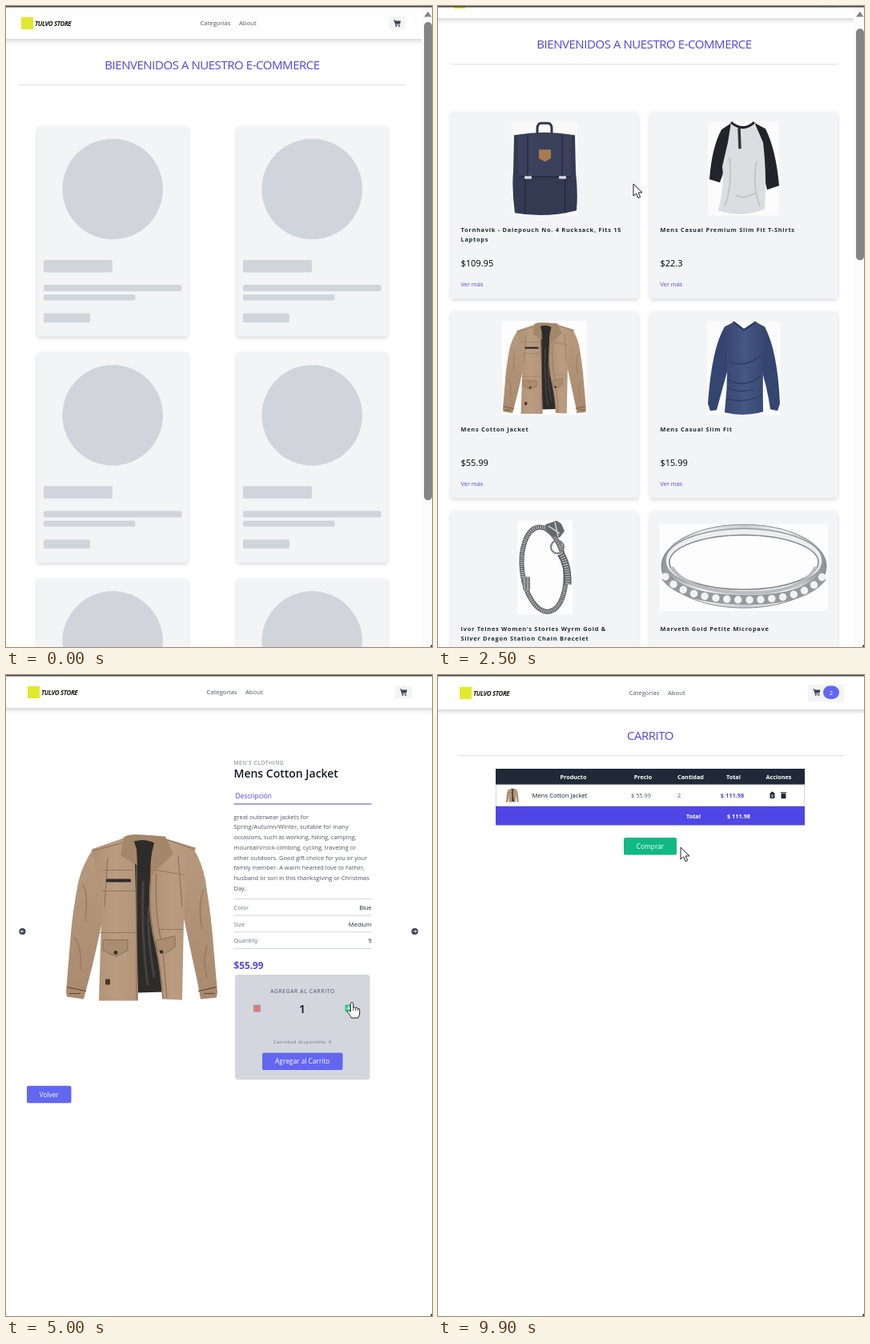
These frames come from a looping animation (532x800 px, 10 s). An HTML page:

```html
<!DOCTYPE html>
<html lang="es">
<head>
<meta charset="utf-8">
<title>Tienda</title>
<style>
  html, body { margin: 0; width: 100%; height: 100%; overflow: hidden; background: #fff; }
  svg { display: block; width: 532px; height: 800px; }
  text { font-family: "Open Sans", "Noto Sans", sans-serif; white-space: pre; }
  .card { filter: drop-shadow(0 2px 2.5px rgba(0,0,0,.15)); }
  .bar { filter: drop-shadow(0 2px 3px rgba(0,0,0,.2)); }
</style>
</head>
<body>
<svg id="stage" viewBox="0 0 532 800"></svg>
<script>
const LOOP = 10000;
const INK = '#1f2937', GREY = '#4b5563', INDIGO = '#4f46e5', VIOLET = '#6366f1', PALE = '#d1d5db', GREEN = '#10b981';

const rect = (x, y, w, h, fill, r = 0, more = '') =>
  `<rect x="${x}" y="${y}" width="${w}" height="${h}" rx="${r}" fill="${fill}" ${more}/>`;
const oval = (x, y, rx, ry, fill, more = '') =>
  `<ellipse cx="${x}" cy="${y}" rx="${rx}" ry="${ry}" fill="${fill}" ${more}/>`;
const path = (d, fill, more = '') => `<path d="${d}" fill="${fill}" ${more}/>`;
const line = (d, color, w = 1, more = '') =>
  path(d, 'none', `stroke="${color}" stroke-width="${w}" ${more}`);
const text = (x, y, str, size, fill = INK, more = '') =>
  `<text x="${x}" y="${y}" font-size="${size}" fill="${fill}" ${more}>${str.replace(/&/g, '&amp;')}</text>`;
const group = (body, more = '') => `<g ${more}>${body}</g>`;
const at = (x, y, body, scale = 1) => group(body, `transform="translate(${x} ${y}) scale(${scale})"`);
const spaced = em => `letter-spacing="${em}em"`;
const ramp = (id, dir, ...colors) => `<linearGradient id="${id}" ${dir}>` + colors.map((c, i) =>
  `<stop offset="${i / (colors.length - 1)}" stop-color="${c}"/>`).join('') + '</linearGradient>';
const MID = 'text-anchor="middle"', END = 'text-anchor="end"', BOLD = 'font-weight="700"', SEMI = 'font-weight="600"';

// ---- shared parts
const cartIcon = (x, y) => at(x, y,
  path('M-4.5-4h1.9l.5 1.1h6.6l-1 3.9h-5l.2.9h4.7v.9h-5.6l-1.4-5.7h-.9z', '#374151') +
  oval(-1.2, 3.6, .95, .95, '#374151') + oval(2.6, 3.6, .95, .95, '#374151'));

function nav(width, dx, badge) {
  const h = badge ? 43 : 41, low = badge ? 1 : 0, links = 242 + dx - (badge ? 12 : 0);
  return rect(-8, -6, width + 16, h + 6, '#fff', 0, 'class="bar"') +
    rect(19 + dx, 14 + low, 15, 15, '#dfea2c') +
    text(36 + dx, 25 + low, 'TULVO STORE', 8, '#1c1d10', `${BOLD} font-style="italic" ${spaced(-.05)}`) +
    text(links + .5, 24 + low, 'Categorias', 7.7, GREY) +
    text(links + 49, 24 + low, 'About', 7.7, GREY) +
    (badge
      ? rect(462, 12, 45, 21.5, '#f3f4f6', 2) + cartIcon(473, 21.5) +
        rect(481, 13.5, 20, 16.5, VIOLET, 8.25) + text(491, 24.5, '2', 7.6, '#fff', MID)
      : rect(478 + dx, 13.5, 21, 16, '#f3f4f6', 2) + cartIcon(488.5 + dx, 21.5));
}

const heading = (x, y, str, from, to) =>
  text(x, y, str, 15, INDIGO, `${MID} ${spaced(-.03)}`) + rect(from, y + 19, to - from, 1, '#dcdee2');

const button = (x, y, w, label, fill, more = '') =>
  rect(x, y, w, 21.5, fill, 2, more) + text(x + w / 2, y + 13.8, label, 8.35, '#fff', MID);

// ---- product pictures
const jacket = (() => {
  const seam = '#8a6e54', flap = '#aa8c70', dark = '#2d2c2a', edge = `stroke="${seam}"`;
  return path('M34 19Q20 40 15 62Q8 100 6 125L0 198L1 204L22 207L26 192Q40 140 48 92L58 40Z', 'url(#sleeve)') +
    path('M158 17Q172 40 175 65Q182 110 184 140L189 198L188 205L168 207L164 185Q152 130 144 92L136 40Z', 'url(#sleeve)') +
    path('M72 6L32 20Q42 60 44 110L41 209H90V20Z', 'url(#cloth)') +
    path('M84 12H110L122 198L90 199L86 36Z', dark) +
    line('M96 60Q94 130 102 190M104 90Q100 120 110 180', '#45433f', 3) +
    path('M122 6L162 18Q148 60 147 110L145 208L120 207Q118 170 111 140Q101 100 105 56L108 30Z', 'url(#cloth)') +
    path('M72 5Q78 0 98 2L124 4L134 26L112 46L106 56Q104 40 108 20L88 19L89 40L68 28Z', '#a4866a') +
    path('M85 10Q98 6 110 12L108 21L88 20Z', dark) +
    line('M88 40V208M106 56Q102 100 112 140Q119 170 121 206M113 50Q110 100 120 140L126 206', seam, 1.1) +
    line('M42 124H88M116 120L146 120M46 46H84M112 46L148 52M45 72H86', seam, .8) +
    line('M33 22L70 12M160 20L126 8M52 30L48 92M140 28L145 92', seam, 1) +
    line('M20 64Q28 70 24 110M10 130Q20 140 18 170M172 70Q164 90 170 120M176 140Q170 160 176 180', '#9c7f64', 2) +
    rect(50, 57, 31, 4, dark, 1) +
    path('M46 133H77V146L62 154L46 146Z', flap, edge) +
    path('M112 134L136 128V142L124 150L114 146Z', flap, edge) +
    oval(62, 149, 2.4, 2.4, '#3a2f22') + oval(119, 148, 2.2, 2.2, '#3a2f22') +
    rect(49, 182, 6, 7, '#4a3624', 1) +
    line('M1 192L25 197M165 197L188 192M4 200H18M172 200H186', '#5c452c', 1.2);
})();

const backpack = rect(92, 170, 82, 117, '#fafafa') +
  line('M124 186V179Q124 172 129 172H137Q142 172 142 179V186', '#323850', 3) +
  path('M95 187Q133 180 171 187L172 232Q175 260 173 281Q134 291 96 284Q92 255 94 232Z', '#343a52') +
  path('M99 187Q133 182 167 187L166 239H101Z', '#3b415b') +
  line('M112 187V239M155 187V239M101 239H166M109 240V284M159 240V284', '#222740', 1.2) +
  path('M126 205H141V216L133.5 220L126 216Z', '#a87c50') +
  rect(108, 238, 9, 3.5, '#d6d8de', 1) + rect(151, 238, 9, 3.5, '#d6d8de', 1);

const shirt = rect(337, 170, 89, 117, '#fbfbfb') +
  path('M366 172L354 180Q342 202 339 242L352 246L364 212ZM396 172L409 179Q422 205 426 250L411 255L400 212Z', '#22242b') +
  path('M366 171Q381 180 395 171L406 196Q411 240 408 279Q380 291 350 281Q358 250 355 226L362 196Z', '#dcdde0') +
  line('M366 171Q381 184 395 171', '#22242b', 3) + line('M376 178L377 204', '#33353c', 3.5) +
  line('M364 215Q368 250 358 276M398 220Q392 250 402 276M372 262Q384 268 398 258', '#c3c5c9', 2);

const sweater = rect(336, 419, 92, 117, '#fbfbfb') +
  path('M368 421L358 426Q342 452 337 522L340 531L348 530Q356 500 364 472ZM398 421L408 426Q424 456 427 522L424 531L415 529Q411 500 402 474Z', '#344570') +
  path('M369 420L382 430L397 420L408 427Q405 470 406 532Q382 539 358 533Q364 480 359 427Z', 'url(#wool)') +
  line('M369 420L382 430L397 420', '#26355c', 2) +
  line('M364 470Q384 478 403 462M362 492Q382 504 403 488M362 502Q376 510 394 504M360 516Q382 522 404 512', '#2d3d68', 1.5);

const bracelet = (() => {
  const tilt = 'transform="rotate(-7 132 729)"';
  return rect(99, 668, 69, 117, '#fdfdfd') +
    oval(132, 729, 27, 53, 'none', `stroke="#5d6063" stroke-width="6" ${tilt}`) +
    oval(132, 729, 27, 53, 'none', `stroke="#bdc0c3" stroke-width="4" stroke-dasharray="1.2 1.4" ${tilt}`) +
    path('M134 673L148 668L154 672L158 681L152 689L143 688L136 682Z', '#66696c') +
    line('M138 675L152 684M146 670L150 688', '#d0d2d4', 1.5) +
    oval(149, 701, 8, 8, 'none', 'stroke="#7d8184" stroke-width="2.2"') +
    line('M153 709Q163 724 162 748', '#5d6063', 9) +
    line('M153 709Q163 724 162 748', '#bdc0c3', 6, 'stroke-dasharray="1.3 1.7"') +
    rect(106, 738, 9, 17, '#777b7e', 2) + line('M108 738V755M112 738V755', '#c8cacc');
})();

const band = rect(277, 672, 210, 109, '#fdfdfd') +
  oval(382, 725, 103, 52, 'url(#silver)', 'stroke="#85888b"') +
  oval(382, 718, 98, 40, '#eceeef', 'stroke="#97999c" stroke-width="1.5"') +
  oval(382, 720, 93, 34, '#fdfdfd', 'stroke="#808386" stroke-width="1.5"') +
  line('M292 726Q310 756 382 758T472 726', '#b9bcbf', 4) +
  line('M284 738Q306 766 382 767T480 738', '#96999c', 12) +
  line('M284 738Q306 766 382 767T480 738', '#f1f2f3', 9.5, 'stroke-dasharray="0 14" stroke-linecap="round"');

const princess = (() => {
  const lean = 'transform="rotate(26 149 984)"', turn = 'transform="rotate(14 118 950)"';
  return rect(83, 917, 100, 117, '#fdfdfd') +
    line('M104 968Q106 1014 122 1030Q140 1020 146 976', '#8b9098', 6) +
    oval(149, 984, 27, 49, 'none', `stroke="#858a92" stroke-width="9" ${lean}`) +
    oval(149, 984, 29, 51, 'none', `stroke="#d9dce1" stroke-width="3" ${lean}`) +
    oval(149, 984, 25, 47, 'none', `stroke="#5f656e" stroke-width="1.5" ${lean}`) +
    line('M104 968Q106 1014 122 1030', '#d5d9df', 3, 'stroke-dasharray="2 1.5"') +
    rect(88, 920, 60, 60, '#858c9a', 15, turn) +
    rect(91, 923, 54, 54, 'none', 13, `stroke="#dfe2e8" stroke-width="4" stroke-dasharray="3 2" ${turn}`) +
    rect(98, 930, 40, 40, '#b5bccb', 10, turn) +
    line('M101 936L136 964M134 934L103 966M118 929V971M97 950H139', '#eef1f6', 2.5) +
    line('M108 931L126 970M97 942L138 958M130 931L110 970', '#8089a0', 1.2);
})();

const tunnel = path('M328 919Q302 942 283 948Q277 982 295 1010Q312 1032 338 1026L370 994Z', 'url(#copper)') +
  line('M283 948Q278 982 296 1010Q313 1031 338 1027', '#efbda4', 4) +
  line('M288 950Q285 980 301 1004Q316 1021 337 1020', '#c07f62', 1.5) +
  oval(342, 959, 33, 42, '#f4cbb6', 'stroke="#cf9072" transform="rotate(-18 342 959)"') +
  oval(345, 958, 27, 36, 'url(#hollow)', 'stroke="#b06f52" transform="rotate(-18 345 958)"');
const tunnels = rect(280, 917, 204, 117, '#fdfdfd') + tunnel + at(105, 0, tunnel);

const products = [
  [['Tornhavik - Dalepouch No. 4 Rucksack, Fits 15', 'Laptops'], '$109.95', backpack],
  [['Mens Casual Premium Slim Fit T-Shirts'], '$22.3', shirt],
  [['Mens Cotton Jacket'], '$55.99', rect(80, 419, 106, 117, '#fdfdfd') + at(81, 420, jacket, .55)],
  [['Mens Casual Slim Fit'], '$15.99', sweater],
  [["Ivor Telnes Women's Stories Wyrm Gold &", 'Silver Dragon Station Chain Bracelet'], '$695', bracelet],
  [['Marveth Gold Petite Micropave'], '$168', band],
  [['White Gold Plated Princess'], '$9.99', princess],
  [['Velvet Newt Rose Gold Plated Stainless Steel', 'Double'], '$10.99', tunnels]
];

// ---- pages
const listTop = nav(519, 0) + heading(257.5, 79, 'BIENVENIDOS A NUESTRO E-COMMERCE', 16, 499);

function skeletons() {
  let out = '';
  for (let i = 0; i < 6; i++) out += at(i % 2 * 249, (i >> 1) * 282.3,
    rect(39, 150, 188.5, 262.5, '#f3f4f6', 3, 'class="card"') + oval(133.2, 228.5, 62.8, 62.8, PALE) +
    rect(47, 317, 86, 15.5, PALE, 2) + rect(47, 348, 172.5, 8, PALE, 2) +
    rect(47, 360, 114.5, 7.5, PALE, 2) + rect(47, 383.5, 58, 11.5, PALE, 2));
  return out;
}

const cards = products.map(([title, price], i) => at(i % 2 * 249, 158 + (i >> 1) * 249,
  rect(16, 0, 234, 233, '#f3f4f6', 4, 'class="card"') +
  title.map((s, n) => text(28.5, 149.7 + n * 12, s, 7.4, INK, `${BOLD} ${spaced(.1)}`)).join('') +
  text(28.5, 193, price, 11, '#000', 'font-weight="500"') + text(28.5, 218, 'Ver más', 7.4, INDIGO))).join('');

const about = ['great outerwear jackets for', 'Spring/Autumn/Winter, suitable for many',
  'occasions, such as working, hiking, camping,', 'mountain/rock climbing, cycling, traveling or',
  'other outdoors. Good gift choice for you or your', 'family member. A warm hearted love to Father,',
  'husband or son in this thanksgiving or Christmas', 'Day.'];
const specs = [['Color', 'Blue'], ['Size', 'Medium'], ['Quantity', '9']];

const arrow = (x, y, dir) => oval(x, y, 4.1, 4.1, '#374151') +
  line(`M${x - 2 * dir} ${y}h${4 * dir}m${-1.8 * dir}-1.8l${1.8 * dir} 1.8l${-1.8 * dir} 1.8`, '#fff', .9);

const panel = rect(286, 374, 168.5, 131, '#d3d6dc', 4) +
  text(370.5, 397, 'AGREGAR AL CARRITO', 6.7, GREY, `${MID} ${spaced(.1)}`) +
  rect(309, 411.5, 9, 9, '#a78bda', 1) + rect(310, 412.5, 6.5, 7, '#e87a62', 1) +
  rect(423.5, 411.5, 9, 9, '#2fc48d', 1) + line('M425 416h6M428 413v6', '#e6faf1', 1.2) +
  text(370, 421.5, '1', 15, '#111827', `${MID} ${SEMI} id="count"`) +
  text(370.5, 460, 'Cantidad disponible: 9', 5.8, '#6b7280', `${MID} ${spaced(.1)}`) +
  button(320, 471.5, 100.5, 'Agregar al Carrito', VIOLET);

const done = button(323, 375.5, 95.5, 'Finalizar compra', GREEN, 'id="finish"') +
  rect(284.5, 405, 172, 11.5, '#e9faf2') +
  text(370.5, 413, 'Ya cargaste 2 en el carrito', 5.7, '#0f9d70', `${MID} ${spaced(.1)}`);

function detail(bought) {
  const mid = bought ? 280.5 : 320;
  const info = text(284.5, 111.5, "MEN'S CLOTHING", 6.55, '#6b7280', spaced(.1)) +
    text(284.5, 128, 'Mens Cotton Jacket', 14, '#111827', SEMI) +
    text(286.5, 153.5, 'Descripción', 8.3, INDIGO) + rect(284.5, 160.5, 172, 1, INDIGO) +
    about.map((s, i) => text(284.5, 179.5 + i * 12.75, s, 7.45, GREY)).join('') +
    specs.map(([k, v], i) => rect(284.5, 279 + i * 20.6, 172, 1, PALE) +
      text(284.5, 293 + i * 20.6, k, 7.4, '#6b7280') + text(456.5, 293 + i * 20.6, v, 7.4, INK, END)).join('') +
    rect(284.5, 341, 172, 1, PALE);
  return nav(532, 8, bought) + at(75, mid - 122.5, jacket) + arrow(20.5, mid, -1) + arrow(510.5, mid, 1) +
    at(0, bought ? 2 : 0, info + text(284.5, 366.5, '$55.99', 11.8, INDIGO, BOLD)) + (bought ? done : panel) +
    button(26, bought ? 432.3 : 512.8, 55.5, 'Volver', VIOLET);
}

const heads = [[169, 'Producto'], [256, 'Precio'], [315.5, 'Cantidad'], [369, 'Total'], [425.5, 'Acciones']];
const basket = nav(532, 8, true) + heading(265, 81, 'CARRITO', 24.5, 507) +
  rect(72, 117, 386, 20, INK) +
  heads.map(([x, s]) => text(x, 129.5, s, 7.3, '#fff', `${MID} ${BOLD}`)).join('') +
  rect(72.5, 137, 385, 26.5, '#fff', 0, 'stroke="#d1d5db"') +
  at(85, 141.5, jacket, .083) + text(117.5, 153, 'Mens Cotton Jacket', 7.7, '#111827') +
  text(241, 153, '$ 55.99', 7.4, GREY) + text(299, 153, '2', 7.4, GREY) +
  text(367.5, 153, '$ 111.98', 7.4, INDIGO, `${MID} ${BOLD}`) +
  rect(414.5, 147, 6, 7, INK, 1) + rect(416, 145.8, 3, 2, INK) + line('M416 150h3M416 152h3', '#fff', .8) +
  rect(428.5, 148, 6, 6.2, INK, 1) + rect(428, 146.2, 7, 1.2, INK) +
  rect(72, 164, 386, 23.5, INDIGO) +
  text(319, 178.5, 'Total', 7.3, '#fff', `${MID} ${BOLD}`) +
  text(375.5, 178.5, '$ 111.98', 7.3, '#fff', `${MID} ${BOLD}`) +
  button(232, 203, 66, 'Comprar', GREEN);

const page = (id, body) => group(body, `id="${id}" display="none"`);
const DOWN = 'x2="0" y2="1"';
const stage = document.getElementById('stage');
stage.innerHTML =
  group(ramp('silver', '', '#8f9295', '#f1f2f3', '#c9cbce', '#f4f5f5', '#8b8e91') +
    ramp('cloth', '', '#ae9074', '#ba9d81', '#b2947a') + ramp('sleeve', DOWN, '#b7997d', '#a98a6e') +
    ramp('wool', '', '#37476f', '#465784', '#37476f') + ramp('copper', '', '#dd9c7e', '#fbe6db', '#d08d6e') +
    ramp('hollow', DOWN, '#c98d70', '#b3775c', '#e2a88d')) +
  rect(0, 0, 532, 800, '#fff') +
  page('loading', listTop + skeletons()) +
  page('list', listTop + cards + group(products.map(p => p[2]).join(''), 'id="photos"')) +
  page('blank', nav(532, 8)) +
  page('detail', detail(false)) + page('bought', detail(true)) + page('basket', basket) +
  group(rect(519, 0, 13, 800, '#fbfbfb') + path('M522 13.5L526.8 7L531.6 13.5Z', '#858585') +
    rect(522, 20, 10, 289, '#858585', 5, 'id="thumb"'), 'id="scroll"') +
  rect(0, 0, 532, 1.6, '#4a4a4a') + rect(530.5, 797.5, 1.5, 2.5, '#222') +
  group(path('M0 0V15L3.6 11.8L6 17.6L8.6 16.4L6.2 10.9H11Z', '#fff',
    'stroke="#222" stroke-linejoin="round"'), 'id="pointer"') +
  group(path('M-1.7 1.5Q0-1 1.7 1.5V7Q3.5 5.5 4.6 7.4Q6.4 6.4 7.3 8.3Q9.5 7.6 9.7 10V14Q9.5 17 7.6 20H-.6Q-2 16.5-5.6 12.6Q-5.5 9.5-1.7 12Z',
    '#fff', 'stroke="#222" stroke-linejoin="round"') +
    line('M1.7 7V11M4.6 7.4V11M7.3 8.3V11', '#222', .8), 'id="hand"');

// ---- motion
const $ = Object.fromEntries([...stage.querySelectorAll('[id]')].map(el => [el.id, el]));
const show = (el, on) => el.setAttribute('display', on ? 'inline' : 'none');
const ease = (t, a, b) => {
  const p = Math.min(1, Math.max(0, (t - a) / (b - a)));
  return p * p * (3 - 2 * p);
};
const pages = [[0, 'loading'], [1700, 'list'], [3700, 'blank'], [4150, 'detail'], [7450, 'bought'], [9000, 'basket']];
const counts = [[0, 1], [5200, 2], [5450, 3], [5700, 4], [6250, 3], [6500, 2]];
const moves = [[1700, 300, -20], [1980, 244, 222], [3000, 244, 222], [3300, 199, 324], [3580, 42, 326],
  [4200, 42, 326], [4850, 432, 408], [5750, 432, 408], [6200, 313, 424], [6650, 313, 424], [7150, 372, 482],
  [7550, 372, 482], [8050, 374, 390], [9150, 374, 390], [9800, 303, 215]];
const hands = [[3520, 3700], [4780, 5830], [6120, 6730], [7080, 7450], [7980, 9000]];
const current = (list, t) => list.filter(k => k[0] <= t).pop()[1];

function cursorAt(t) {
  const i = moves.findIndex(m => m[0] > t);
  if (i < 1) return (i ? moves[moves.length - 1] : moves[0]).slice(1);
  const [a, x, y] = moves[i - 1], [b, u, v] = moves[i], p = ease(t, a, b);
  return [x + (u - x) * p, y + (v - y) * p];
}

function draw(t) {
  const now = current(pages, t);
  pages.forEach(([, id]) => show($[id], id === now));

  const s = [2400, 2600, 2800].reduce((sum, a) => sum + ease(t, a, a + 300), 0) / 3;
  $.list.setAttribute('transform', `translate(0 ${-294 * s})`);
  $.photos.setAttribute('opacity', t < 2400 ? .8 : 1);
  show($.scroll, now === 'loading' || now === 'list');
  $.thumb.setAttribute('y', 20 + 95 * s);
  $.thumb.setAttribute('height', now === 'loading' ? 597 : 289);

  $.count.textContent = current(counts, t);
  const over = hands.some(([a, b]) => t >= a && t < b);
  $.finish.setAttribute('fill', over ? '#059669' : GREEN);
  const place = `translate(${cursorAt(t).join(' ')})`;
  $.pointer.setAttribute('transform', place);
  $.hand.setAttribute('transform', place);
  show($.pointer, t >= 1700 && !over);
  show($.hand, over);
}

const start = performance.now();
function tick() {
  draw((performance.now() - start) % LOOP);
  requestAnimationFrame(tick);
}
tick();
</script>
</body>
</html>
```
